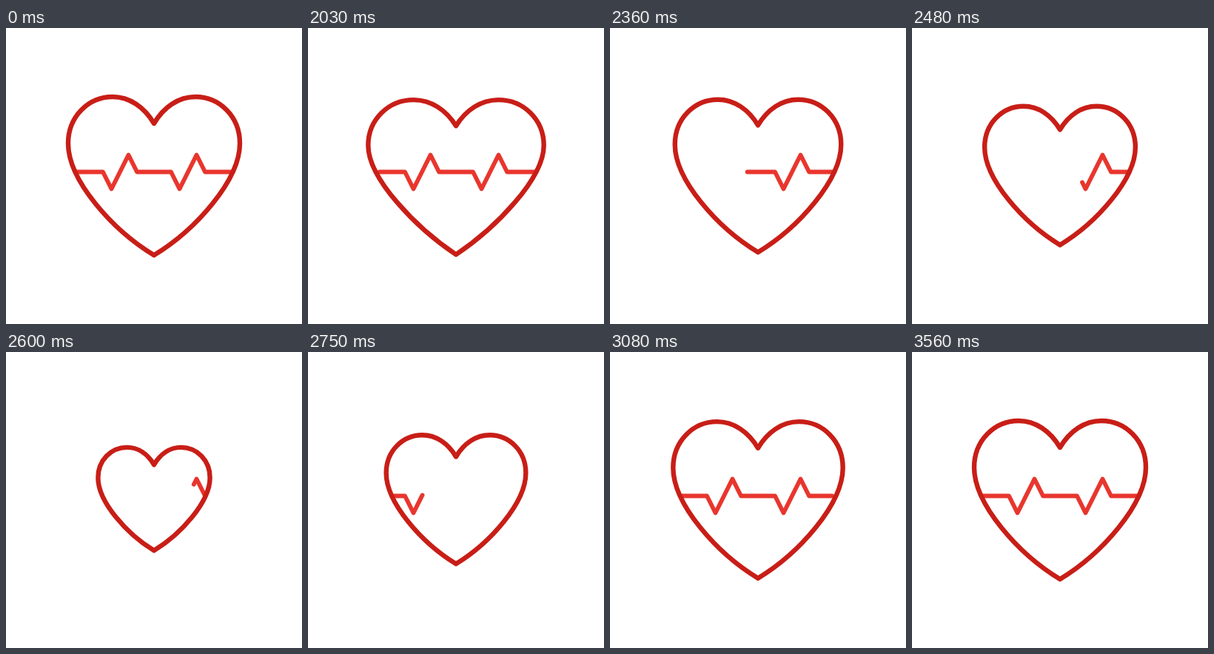
Write an HTML page with a canvas that moves like this. It is 400 px wide and 400 px high and loops after 3710 ms.

```html
<!DOCTYPE html>
<html lang="en">
<head>
<meta charset="utf-8">
<title>Heartbeat</title>
<style>
  html, body { margin: 0; width: 100%; height: 100%; overflow: hidden; background: #fff; }
  canvas { display: block; }
</style>
</head>
<body>
<canvas id="stage" width="400" height="400"></canvas>
<script>
const ctx = document.getElementById('stage').getContext('2d');
const LOOP = 3710, BEAT = 2030, STEP = 30, END = 3240;
const CX = 200, CY = 196;

const linear = u => u;
const sine = u => (1 - Math.cos(Math.PI * u)) / 2;
const easeOut = u => 1 - (1 - u) ** 2.5;
const span = (t, a, b) => Math.min(1, Math.max(0, (t - a) / (b - a)));

// time, scale x, scale y, shift y, pinch of the lower sides, easing towards this pose
const poses = [
  [2000, 1, 1, 0, 0, linear],
  [2130, 1.1, .9, 7.4, 17, linear],
  [2255, .679, .675, 0, 0, sine],
  [2390, 1.006, 1.002, 0, 0, sine],
  [2610, .65, .65, 0, 0, sine],
  [END, 1, 1, 0, 0, easeOut]
];

function poseAt(t) {
  const i = poses.findIndex(p => p[0] > t);
  if (t < BEAT || i < 0) return [1, 1, 0, 0];
  const from = poses[i - 1], to = poses[i];
  const k = to[5](span(t, from[0], to[0]));
  return [1, 2, 3, 4].map(n => from[n] + (to[n] - from[n]) * k);
}

function traceHeart([sx, sy, dy, pinch]) {
  const upperY = 206 - pinch, lowerX = 56 - pinch, lowerY = 273 - pinch * .6;
  ctx.save();
  ctx.translate(CX, CY + dy);
  ctx.scale(sx, sy);
  ctx.translate(-CX, -CY);
  ctx.beginPath();
  ctx.moveTo(200, 129);
  ctx.bezierCurveTo(187, 107, 167, 93, 144, 93);
  ctx.bezierCurveTo(111, 93, 84, 120, 84, 156);
  ctx.bezierCurveTo(84, upperY, CX - lowerX, lowerY, 200, 307);
  ctx.bezierCurveTo(CX + lowerX, lowerY, 316, upperY, 316, 156);
  ctx.bezierCurveTo(316, 120, 289, 93, 256, 93);
  ctx.bezierCurveTo(233, 93, 213, 107, 200, 129);
  ctx.closePath();
  ctx.restore();
}

const pulse = [[85, 194.5]];
for (const x of [131, 223])
  pulse.push([x, 194.5], [x + 11.5, 217.5], [x + 34.5, 171.5], [x + 46, 194.5]);
pulse.push([315, 194.5]);
const length = pulse.slice(1).reduce(
  (sum, [x, y], i) => sum + Math.hypot(x - pulse[i][0], y - pulse[i][1]), 0);

function strokePulse(offset) {
  ctx.setLineDash([length, length]);
  ctx.lineDashOffset = offset;
  ctx.beginPath();
  pulse.forEach(p => ctx.lineTo(...p));
  ctx.stroke();
  ctx.setLineDash([]);
}

function draw(t) {
  ctx.fillStyle = '#fff';
  ctx.fillRect(0, 0, 400, 400);
  ctx.lineCap = ctx.lineJoin = 'round';
  const pose = poseAt(t);

  ctx.save();
  traceHeart(pose);
  ctx.clip();
  ctx.strokeStyle = '#e8362e';
  ctx.lineWidth = 5.8;
  const erased = t < BEAT ? 0 : span(t, 2004, 2781);
  const redrawn = easeOut(span(t, 2679, END));
  if (erased < 1) strokePulse(-erased * length);
  if (redrawn > 0) strokePulse((1 - redrawn) * length);
  ctx.restore();

  traceHeart(pose);
  ctx.strokeStyle = '#c81e17';
  ctx.lineWidth = 6.4;
  ctx.stroke();
}

const start = performance.now();
function frame() {
  const t = (performance.now() - start) % LOOP;
  draw(BEAT + STEP * Math.floor((t - BEAT) / STEP));
  requestAnimationFrame(frame);
}
frame();
</script>
</body>
</html>
```
